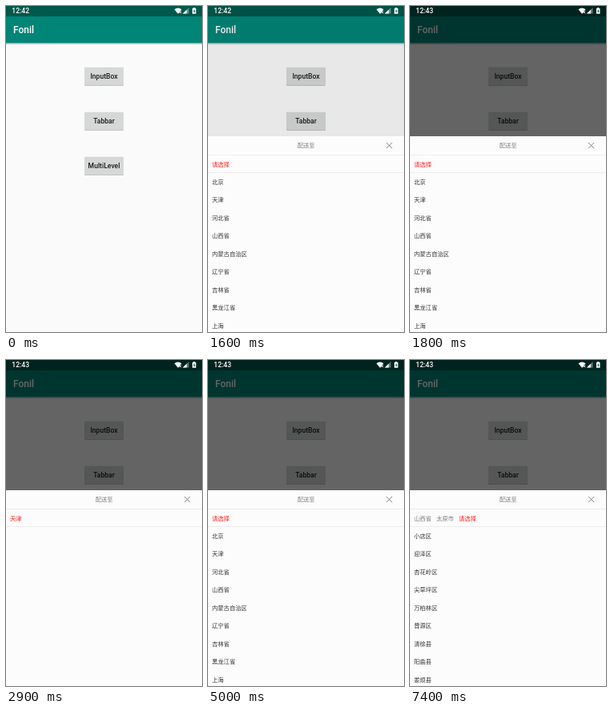
These frames come from a looping animation (245 px wide and 408 px high, 8000 ms). An HTML page:

```html
<!DOCTYPE html>
<html>
<head>
<meta charset="utf-8">
<style>
  html, body { margin: 0; width: 100%; height: 100%; overflow: hidden; background: #fafafa; }
  svg { display: block; width: 245px; height: 408px; }
  text { font-family: Roboto, "Noto Sans", sans-serif; }
  .bold { font-weight: 500; }
  .cjk text { font: 7.3px "Noto Sans CJK SC", "Noto Sans CJK", sans-serif; fill: #333; }
  .cjk .grey { fill: #7c7c7c; }
  .cjk .red { fill: #ff1a1a; }
</style>
</head>
<body>
<svg viewBox="0 0 245 408">
  <defs>
    <linearGradient id="fall" x2="0" y2="1">
      <stop stop-color="#000" stop-opacity=".3"/>
      <stop offset="1" stop-color="#000" stop-opacity="0"/>
    </linearGradient>
  </defs>
  <rect width="245" height="408" fill="#fafafa"/>
  <rect y="46" width="245" height="3" fill="url(#fall)"/>
  <rect y="12" width="245" height="34.3" fill="#008577"/>
  <rect width="245" height="13" fill="#00574b"/>
  <text class="bold" x="9" y="34.4" font-size="12" fill="#fff">Fonil</text>
  <g id="buttons"></g>
  <rect id="dim" width="245" height="408" opacity="0"/>
  <g fill="#fff">
    <text class="bold" id="clock" x="7.3" y="9.2" font-size="8.6"></text>
    <path d="M210.5 4.2Q215 .8 219.5 4.2L215 9.8Z"/>
    <path d="M216.2 6.2l3 3m0-3l-3 3" stroke="#fff" stroke-width=".9"/>
    <path d="M228.5 2v7.6h-7.6Z" opacity=".4"/>
    <path d="M225.8 4.7v4.9h-4.9Z"/>
    <path d="M234 2h2.4v.9h1.1v6.9h-4.6V2.9H234Z"/>
    <path d="M235.6 4l-1.7 2.8h1.1v2l1.6-2.8h-1Z" fill="#00574b"/>
  </g>
  <g id="sheet" class="cjk" visibility="hidden">
    <rect y="163" width="245" height="245" fill="#fcfcfc"/>
    <path d="M0 186.5H245M0 208.5H245" stroke="#ededed"/>
    <text class="grey" x="122.7" y="177.4" text-anchor="middle">配送至</text>
    <path d="M223 171l7.2 7.2m0-7.2l-7.2 7.2" stroke="#777" stroke-width=".9"/>
    <g id="tabs"></g>
    <g id="rows"></g>
    <circle id="dot" cx="123" cy="301" r="1" fill="#555"/>
  </g>
</svg>
<script>
const LOOP = 8000, EM = 7.3;
const $ = id => document.getElementById(id);
const PICK = '请选择';
const provinces = '北京 天津 河北省 山西省 内蒙古自治区 辽宁省 吉林省 黑龙江省 上海';

// start time, tabs, list, loading dot
const screens = [
  [1600, PICK, provinces],
  [2900, '天津', ''],
  [3000, '天津 ' + PICK, '天津市'],
  [3800, '天津 天津市', '', true],
  [3900, '天津 天津市 ' + PICK, '和平区 河东区 河西区 南开区 河北区 红桥区 东丽区 西青区 津南区'],
  [5000, PICK, provinces],
  [6100, '山西省', '', true],
  [6200, '山西省 ' + PICK, '太原市 大同市 阳泉市 长治市 晋城市 朔州市 晋中市 运城市 忻州市'],
  [7300, '山西省 太原市', ''],
  [7400, '山西省 太原市 ' + PICK, '小店区 迎泽区 杏花岭区 尖草坪区 万柏林区 晋源区 清徐县 阳曲县 娄烦县']
];
const dims = [[0, 0], [1600, .07], [1700, .36], [1800, .6]];
const presses = [[0, 0], [1100, .06], [1200, .13], [1300, .08], [1400, 0]];

const words = s => s ? s.split(' ') : [];
const at = (steps, t) => steps.filter(s => s[0] <= t).pop();
const label = (x, y, s, cls) => `<text x="${x}" y="${y}" class="${cls}">${s}</text>`;

function tabsMarkup(names) {
  let x = 5;
  return names.map((name, i) => {
    const tab = label(x, 200.7, name, i === names.length - 1 ? 'red' : 'grey');
    x += name.length * EM + 6.1;
    return tab;
  }).join('');
}

$('buttons').innerHTML = ['InputBox', 'Tabbar', 'MultiLevel'].map((name, i) => {
  const y = 76.7 + i * 56;
  const box = (dy, fill, rest = '') =>
    `<rect x="98" y="${y + dy}" width="49" height="22.3" rx="1" fill="${fill}" ${rest}/>`;
  return box(.9, '#000', 'opacity=".22"') + box(0, '#d6d7d7') +
    box(0, '#000', `id="press${i}" opacity="0"`) +
    `<text class="bold" x="122.5" y="${y + 14.3}" font-size="8.6" text-anchor="middle" fill="#1c1c1c">${name}</text>`;
}).join('');

let shown;
function render(t) {
  $('dim').setAttribute('opacity', at(dims, t)[1]);
  $('press2').setAttribute('opacity', at(presses, t)[1]);
  $('clock').textContent = t < 1700 ? '12:42' : '12:43';
  const screen = at(screens, t);
  $('sheet').setAttribute('visibility', screen ? 'visible' : 'hidden');
  if (!screen || screen === shown) return;
  shown = screen;
  const [, tabs, list, loading] = screen;
  $('tabs').innerHTML = tabsMarkup(words(tabs));
  $('rows').innerHTML = words(list).map((s, i) => label(5, 222.9 + i * 22.45, s, '')).join('');
  $('dot').setAttribute('opacity', loading ? 1 : 0);
}

const start = performance.now();
function tick() {
  render((performance.now() - start) % LOOP);
  requestAnimationFrame(tick);
}
tick();
</script>
</body>
</html>
```
